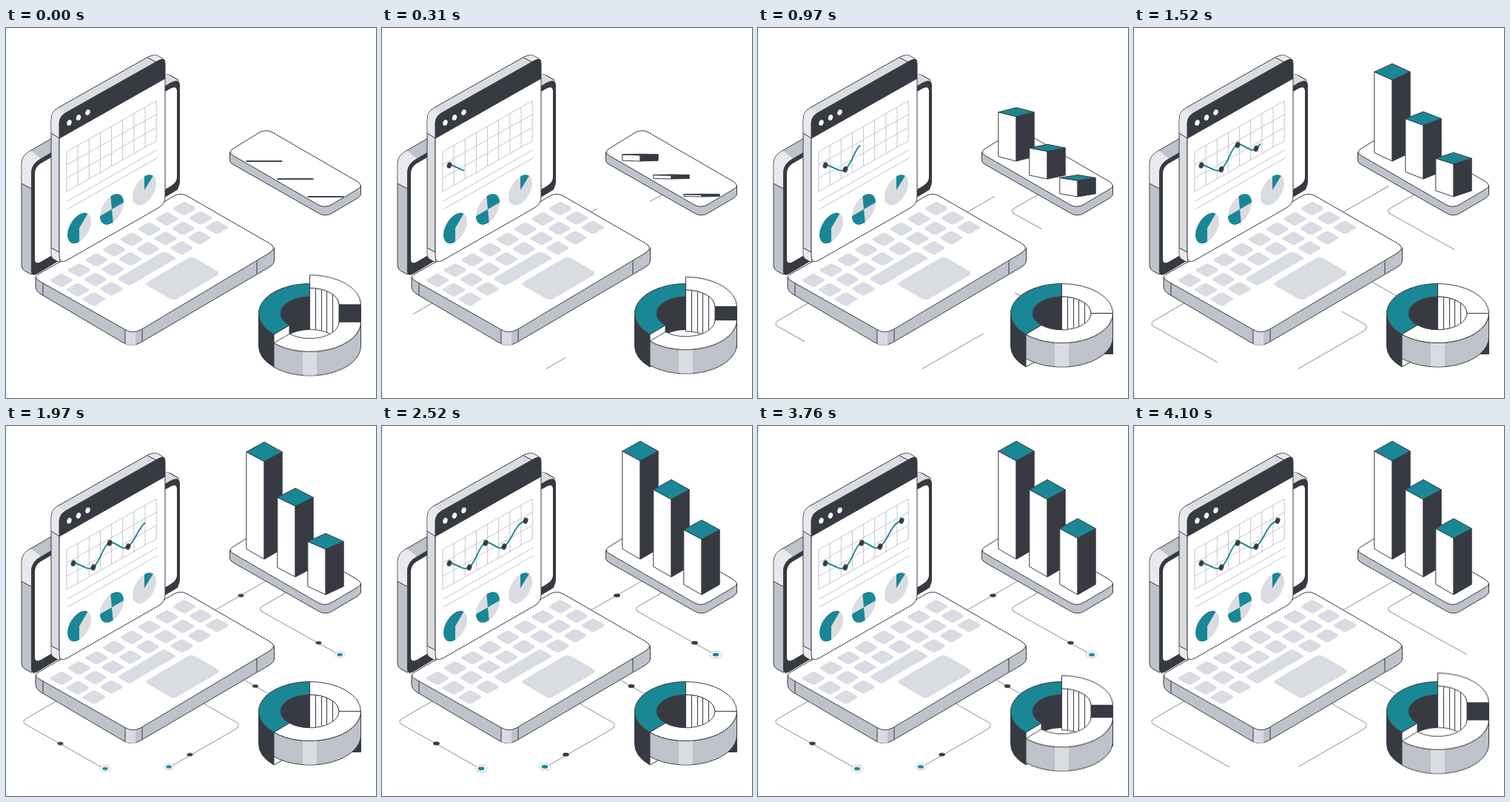
An HTML page that plays this animation: 500 px wide and 500 px high, repeating every 4.13 s.

```html
<!DOCTYPE html>
<html lang="en">
<head>
<meta charset="utf-8">
<title>Isometric analytics</title>
<style>
  html, body { margin: 0; width: 100%; height: 100%; overflow: hidden; background: #fff; }
  svg { display: block; width: 100vw; height: 100vh; }

  .dark { fill: #383a41; }
  .teal { fill: #1a8796; }
  .pale { fill: #e8eaee; }
  .light { fill: #d9dce1; }
  .mid { fill: #bec2cb; }
  .white { fill: #fff; }
  .edge { stroke: #3a3b42; stroke-width: 1; stroke-linejoin: round; }
  .line { fill: none; stroke: #3a3b42; stroke-width: 1; }
  .grid { fill: none; stroke: #c3c5ce; stroke-width: 1; }

  .wire, .trend { fill: none; stroke-dasharray: 1 2; animation: draw 4130ms linear infinite; }
  .wire { stroke: #a6a8b2; stroke-width: 1.3; }
  .trend { stroke: #1a8796; stroke-width: 1.9; animation-name: trend; }
  @keyframes draw { 0% { stroke-dashoffset: 1 } 41.2%, 100% { stroke-dashoffset: 0 } }
  @keyframes trend { 0% { stroke-dashoffset: 1 } 49.9%, 100% { stroke-dashoffset: 0 } }

  .bar, .part, .node { animation: 4130ms cubic-bezier(.333, 0, .667, 1) infinite; }

  /* A registered number keeps the bars redrawn sharply at every height */
  @property --grow { syntax: "<number>"; inherits: true; initial-value: 0; }
  .bar { transform: scaleY(var(--grow)); }
  .bar path { vector-effect: non-scaling-stroke; }
  #bar1 { transform-origin: 349px 180px; animation-name: bar1; }
  #bar2 { transform-origin: 391px 204px; animation-name: bar2; }
  #bar3 { transform-origin: 432px 228px; animation-name: bar3; }
  @keyframes bar1 { 0% { --grow: 0 } 50.1%, 100% { --grow: 1 } }
  @keyframes bar2 { 0% { --grow: 0 } 58.4%, 100% { --grow: 1 } }
  @keyframes bar3 { 0% { --grow: 0 } 66.6%, 100% { --grow: 1 } }

  .part { animation-name: split; }
  @keyframes split {
    0%, 100% { transform: translateY(var(--shift)) }
    24.9%, 75% { transform: translateY(0) }
  }

  .node { transform-box: fill-box; transform-origin: center; animation-name: pop; }
  @keyframes pop {
    0%, 41% { transform: scale(0) }
    49.5%, 90% { transform: scale(1) }
    98.3%, 100% { transform: scale(0) }
  }

  .mark { animation: 4130ms step-end infinite; }
  @keyframes mark0 { 0% { opacity: 0 } .7%, 100% { opacity: 1 } }
  @keyframes mark1 { 0% { opacity: 0 } 10.5%, 100% { opacity: 1 } }
  @keyframes mark2 { 0% { opacity: 0 } 24.6%, 100% { opacity: 1 } }
  @keyframes mark3 { 0% { opacity: 0 } 34.4%, 100% { opacity: 1 } }
  @keyframes mark4 { 0% { opacity: 0 } 49.4%, 100% { opacity: 1 } }
</style>
</head>
<body>
<svg viewBox="0 0 500 500">
  <!-- connectors -->
  <g>
    <path class="wire" pathLength="1" d="M70 370.5L28 395Q20 399.5 28 404L129 461"/>
    <path class="wire" pathLength="1" d="M222 460.5L308 411Q320 404 309 399L265 374"/>
    <path class="wire" pathLength="1" d="M390 218.5L349 242Q339 247.5 348 252L450 309"/>
    <path class="wire" pathLength="1" d="M277 252L352 209"/>
    <path class="wire" pathLength="1" d="M391 383L314 338.5"/>
  </g>
  <g id="nodes"></g>

  <!-- screen -->
  <path class="mid edge" d="M21 184Q21 173 31 167L205 66Q216 60 222 64L232 70V218L34 333L25 328Q21 326 21 320Z"/>
  <path class="pale" d="M21.5 210V184Q21.5 173 31 167.5L34 166L47 176Q34 184 34 196V216Z"/>
  <path class="light" d="M215 62Q219 62 222 64.500L234 71L215 79Z"/>
  <path class="line" d="M21 210L34 217M222 64L234 71"/>
  <path class="dark" d="M34 194Q35 183 46 177L222 74Q235 67 235 78V207Q235 217 226 222L41 333Q34 336 34 328Z"/>
  <path class="white" d="M39 197Q39 188 47 183L222 82Q231 77 231 86V201Q231 209 222 214L47 316Q39 320 39 312Z"/>

  <!-- keyboard -->
  <path class="mid edge" d="M40 337V350Q40 355 46 359L158 425Q169 432 182 425L356 323Q362.5 319 362.5 314V297Z"/>
  <path class="light" d="M161 408V426.5Q168 430 175 428V410Z"/>
  <path class="line" d="M50 345V361M161 408V426.5M184 407V424M339 314V332"/>
  <path class="white edge" d="M45 332Q36 337 45 342L160 407Q170 414 182 408L356 304Q367 297 356 291L245 227Q236 222 227 227Z"/>
  <g id="keys" class="light" transform="matrix(.866 -.505 .866 .5 75 341)"></g>

  <!-- window -->
  <path class="light edge" d="M61 124Q61 113 70 108L192 39Q201 35 206 38L214 43V60L72 149V317L64 312Q61 310 61 305Z"/>
  <path class="pale" d="M61.5 142V124Q61.5 113 70 108.500L80 115L72 130V148.500Z"/>
  <path class="pale" d="M191.500 40Q201 35.500 206 38.500L213 43L203 46ZM61.500 298L72 303.500V316L64 311.500Q61.500 310 61.500 305Z"/>
  <path class="line" d="M61 142L72 149M61 297L72 303M191 40L203 46"/>
  <path class="white edge" d="M72 149L215 68V228Q215 238 206 243L82 314Q72 319 72 309Z"/>
  <path class="dark edge" d="M72 149V129Q72 120 80 115L206 44Q215 39 215 48V68Z"/>
  <g id="lights" class="white"></g>
  <g id="chart"></g>
  <path class="grid" d="M83 234L205 164M83 245L205 175"/>
  <g id="pies"></g>
  <path class="trend" pathLength="1" d="M91 185C100 185 110 197 118 191C128 182 131 162 139 158C148 154 156 170 165 163C176 155 180 131 194 128"/>
  <g id="marks" class="dark"></g>

  <!-- phone -->
  <path class="mid edge" d="M302.5 168V179Q303 183 308 185L422 250Q432 256 441 250L475 230Q479.5 227 479.5 224V213Z"/>
  <path class="white edge" d="M307 163L341 142Q350 136 360 141L474 207Q484 213 475 218L441 238Q432 244 422 239L308 173Q299 168 307 163Z"/>
  <g id="bars"></g>

  <!-- ring -->
  <g class="part" style="--shift:-11.7px">
    <path class="white edge" d="M410.5 363A39.5 22.5 0 0 1 450 385.5V441.5A39.5 22.5 0 0 0 410.5 419Z"/>
    <path class="line" d="M418.5 363.5V419.5M426.5 365V421M433.5 367.5V423.5M441.5 371.5V427.5"/>
    <path class="dark" d="M450 385.5H480V441H450Z"/>
    <path class="white edge" d="M410.5 345.5A69 40 0 0 1 479.5 385.5H450A39.5 22.5 0 0 0 410.5 363Z"/>
  </g>
  <g>
    <path class="dark" d="M371 385.5A39.5 22.5 0 0 1 410.5 363V408A39.5 22.5 0 0 0 371 430.5Z"/>
    <path class="dark edge" d="M341.5 385.5A69 40 0 0 0 362 414V458A69 40 0 0 1 341.5 429.5Z"/>
    <path class="white edge" d="M383 401.5L362 414V458L383 446.5Z"/>
    <path class="teal edge" d="M410.5 345.5A69 40 0 0 0 362 414L383 401.5A39.5 22.5 0 0 1 410.5 363Z"/>
  </g>
  <g class="part" style="--shift:11.7px">
    <path class="mid edge" d="M362 414A69 40 0 0 0 479.5 385.5V418A69 40 0 0 1 362 446.5Z"/>
    <path class="light" d="M401 425Q410 426 420 425V457Q410 458 401 457Z"/>
    <path class="white edge" d="M362 414A69 40 0 0 0 479.5 385.5H450A39.5 22.5 0 0 1 383 401.5Z"/>
  </g>
</svg>
<script>
  const fill = (id, parts) => document.getElementById(id).innerHTML = parts.join('');
  const path = (cls, d) => `<path class="${cls}" d="${d}"/>`;
  const oval = (x, y, rx, ry, attrs = '') =>
    `<ellipse cx="${x}" cy="${y}" rx="${rx}" ry="${ry}" ${attrs}/>`;

  // Keyboard, in the floor plane
  const pad = (u, v, w, h, r) =>
    `<rect x="${u - w / 2}" y="${v - h / 2}" width="${w}" height="${h}" rx="${r}"/>`;
  const keys = [pad(82.2, 50.8, 74, 19.5, 3.5), pad(96.5, 92.5, 74, 46, 6)];
  for (let row = 0; row < 3; row++)
    for (let col = 0; col < 8; col++)
      if (row < 2 || col < 2 || col > 4) keys.push(pad(col * 27.4, row * 25.4, 19.5, 19.5, 3.5));
  fill('keys', keys);

  fill('lights', [[85.5, 128], [98, 121], [110.5, 114]].map(([x, y]) =>
    oval(x, y, 3, 4.1, `transform="rotate(20 ${x} ${y})"`)));

  // Chart grid
  let grid = '';
  for (let i = 0; i <= 8; i++) grid += `M${82 + i * 15.15} ${167 - i * 8.5}v54`;
  for (let i = 0; i <= 3; i++) grid += `M82 ${167 + i * 18}l121.2 -68.5`;
  fill('chart', [path('grid', grid)]);

  fill('marks', [[91, 185.5], [118, 191], [140, 158], [165, 163], [194, 128]].map(([x, y], i) =>
    oval(x, y, 3.2, 4.3, `class="mark" style="animation-name:mark${i}" transform="rotate(20 ${x} ${y})"`)));

  // Pies, in the wall plane; angles run clockwise from the top
  const R = 18.5;
  const rim = a => `${R * Math.sin(a * Math.PI / 180)} ${-R * Math.cos(a * Math.PI / 180)}`;
  const slice = ([from, to]) =>
    path('teal', `M0 0L${rim(from)}A${R} ${R} 0 ${+(to - from > 180)} 1 ${rim(to)}Z`);
  const pie = (x, y, ...slices) =>
    `<g transform="matrix(.866 -.5 0 1 ${x} ${y})"><circle class="light" r="${R}"/>${slices.map(slice).join('')}</g>`;
  fill('pies', [
    pie(99, 270.5, [180, 405]),
    pie(143, 245, [-6, 90], [174, 270]),
    pie(187, 219, [0, 48])
  ]);

  // Bars: x and y of the lower front corner, and height
  fill('bars', [[349, 180, 133], [391, 204, 105], [432, 228, 76.5]].map(([x, y, h], i) =>
    `<g class="bar" id="bar${i + 1}">` +
    path('white edge', `M${x} ${y}l-24.2 -14v${-h + 1}l24.2 13Z`) +
    path('dark edge', `M${x} ${y}l24.2 -14v${-h + 1}l-24.2 13Z`) +
    path('teal edge', `M${x} ${y - h}l-24.2 -13l24.2 -13.5l24.2 13.5Z`) + '</g>'));

  // Connector dots and end points
  fill('nodes', [
    ...[[73.5, 429], [248.5, 444], [317.5, 229], [337, 351.5], [422.5, 293]].map(([x, y]) =>
      oval(x, y, 4.4, 2.5, 'class="node dark"')),
    ...[[134, 463], [220, 460.5], [451, 309]].map(([x, y]) =>
      `<g class="node">${oval(x, y, 8, 4.7, 'fill="#fff" stroke="#bfc1d6"')}${oval(x, y, 4.3, 2.4, 'class="teal"')}</g>`)
  ]);
</script>
</body>
</html>
```
